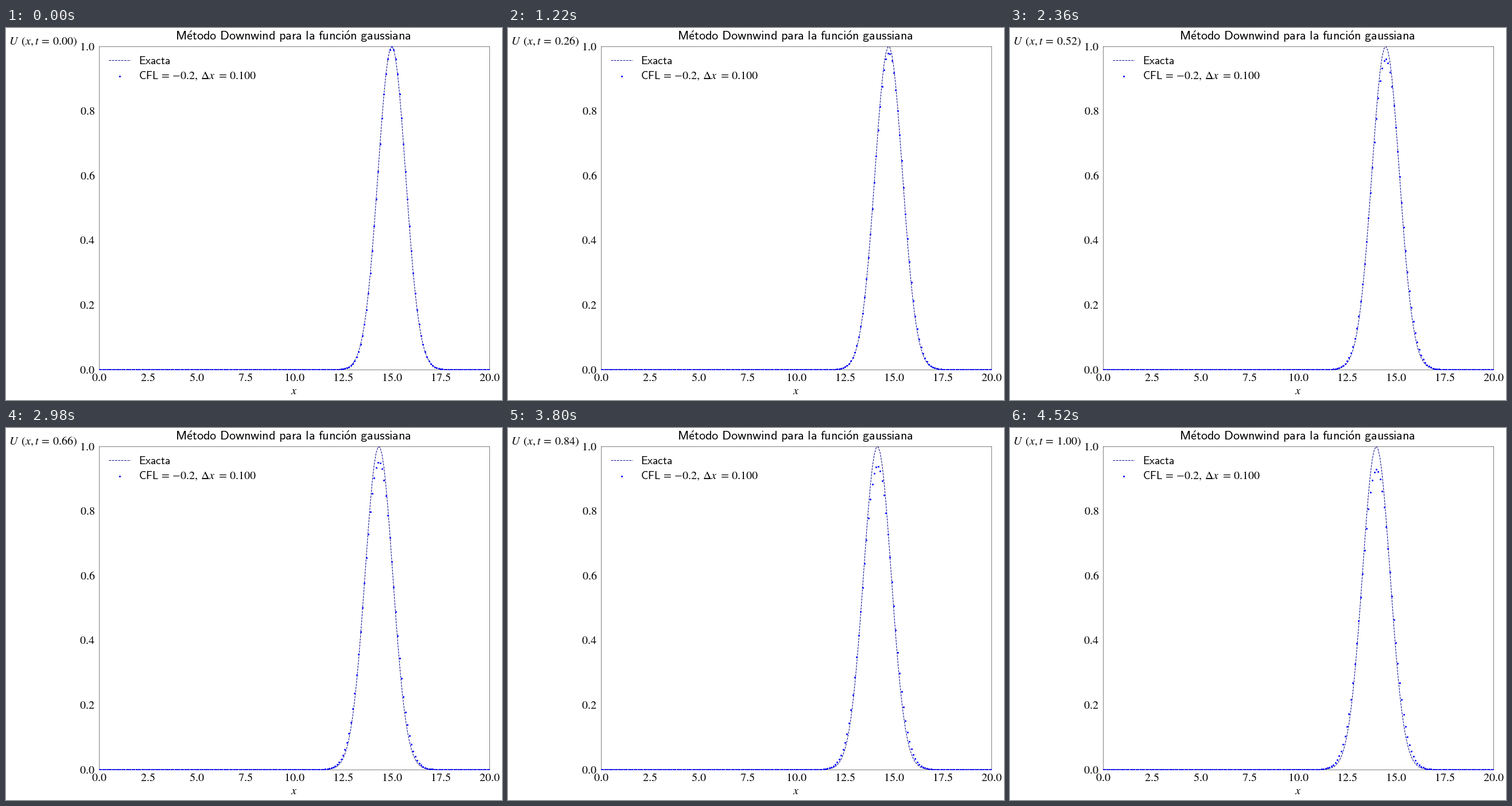
These frames come from a looping animation (864 by 648 pixels, 4620 ms). A matplotlib script:

```python
import numpy as np
import matplotlib.pyplot as plt
from matplotlib.animation import FuncAnimation

W, H, DPI = 864, 648, 72
TICK_MS, LOOP_MS = 20, 4620
INK, DOT, CURVE = "black", "#0000ff", "#00008b"
LEFT, TOP, WIDTH, HEIGHT = 162, 32, 680, 563
DX, CFL, STEPS = 0.1, 0.2, 50
DT = CFL * DX

# Downwind scheme for a pulse moving left at unit speed
x = np.linspace(0, 20, 201)


def pulse(t):
    return np.exp(-(x - 15 + t) ** 2)


levels = [pulse(0)]
for _ in range(STEPS):
    u = levels[-1].copy()
    u[:-1] += CFL * (u[1:] - u[:-1])
    levels.append(u)

# Every ninth step is held only briefly
holds = [20 if n % 9 == 4 else 100 for n in range(STEPS + 1)]
starts = np.cumsum([0] + holds[:-1])

fig = plt.figure(figsize=(W / DPI, H / DPI), dpi=DPI, facecolor="white")
ax = fig.add_axes([LEFT / W, 1 - (TOP + HEIGHT) / H, WIDTH / W, HEIGHT / H])
ax.set(xlim=(0, 20), ylim=(0, 1), xticks=[], yticks=[])
for spine in ax.spines.values():
    spine.set(linewidth=0.5, color=INK)


def label(px, py, s, size=20, ha="left", math="stix"):
    return fig.text(px / W, 1 - py / H, s, fontsize=size, ha=ha,
                    va="baseline", color=INK, math_fontfamily=math)


def sans(px, py, s, size=19.4, ha="left"):
    return label(px, py, rf"$\mathsf{{{s}}}$", size, ha, "cm")


for v in np.arange(0, 20.1, 2.5):
    label(LEFT + WIDTH * v / 20, 615, f"${v:.1f}$", ha="center")
for v in np.arange(0, 1.1, 0.2):
    label(155, 601.7 - HEIGHT * v, f"${v:.1f}$", ha="right")

sans(500.5, 21, r"M\acute{e}todo\ Downwind\ para\ la\ funci\acute{o}n\ gaussiana",
     22.1, "center")
label(502, 638.5, "$x$", ha="center")
clock = label(124, 28.5, "", ha="right")

dash = dict(color=CURVE, lw=1, ls="--")
dots = dict(color=DOT, ls="none", marker=".", ms=6, mew=0, zorder=3)
exact, = ax.plot(x, levels[0], **dash)
approx, = ax.plot(x, levels[0], **dots)


def key(px, py, style):
    fig.add_artist(plt.Line2D(np.array(px) / W, np.full(len(px), 1 - py / H),
                              **style))


key([179, 217], 56.2, dash)
key([198], 83.7, dots)
sans(231, 62.8, "Exacta")
sans(231, 88.8, "CFL")
label(268, 88.8, r"$=\,{-}0.2,$")
label(435.5, 88.8, r"$\Delta x\,\,=\,0.100$", ha="right")


def draw(k):
    n = np.searchsorted(starts, k * TICK_MS, side="right") - 1
    t = n * DT
    exact.set_ydata(pulse(t))
    approx.set_ydata(levels[n])
    clock.set_text(rf"$U\ \,(x,t\:=\:{t:.2f})$")
    return exact, approx, clock


anim = FuncAnimation(fig, draw, frames=LOOP_MS // TICK_MS, interval=TICK_MS,
                     repeat=True)
plt.show()
```
